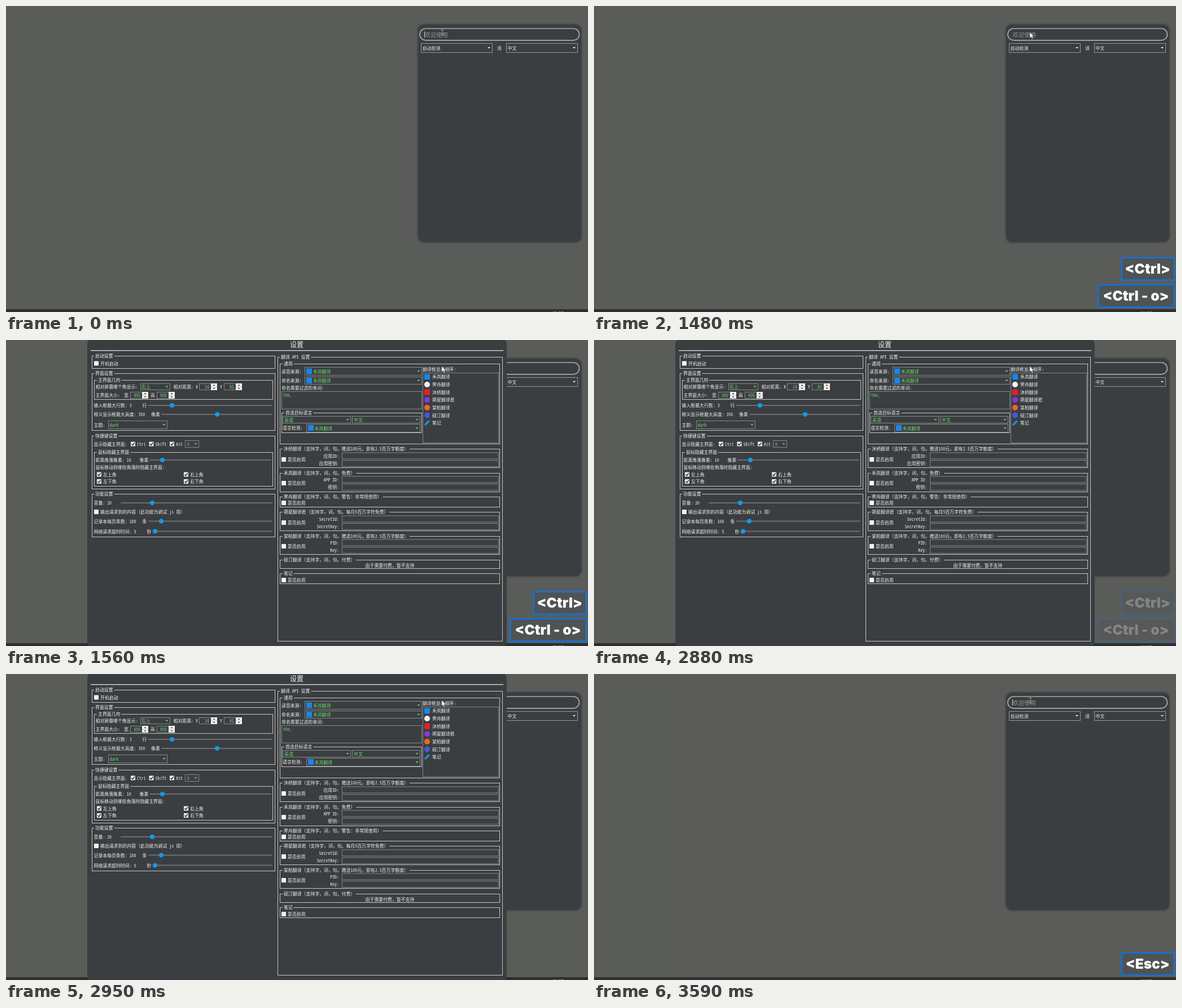
Recreate the animation shown at these times as an HTML page. Size 1031x543 px, loop 3970 ms.

```html
<!DOCTYPE html>
<html>
<head>
<meta charset="utf-8">
<style>
html, body { margin: 0; width: 100%; height: 100%; overflow: hidden; background: #5a5c5a; }
svg { display: block; width: 1031px; height: 543px; }
text { white-space: pre; }
.ui { font: 7.9px "Noto Sans Mono CJK SC", "Noto Sans CJK SC", "Noto Sans CJK", "Noto Sans Mono", monospace; }
.sans { font: 8px "Noto Sans CJK SC", "Noto Sans CJK", "Noto Sans", sans-serif; }
.keys { font: 900 24.5px Inter, "Open Sans", sans-serif; }
</style>
</head>
<body>
<svg id="stage" viewBox="0 0 1031 543"></svg>
<script>
const LOOP = 3970;
const PANEL = '#3b3e40', LINE = '#c4c6c6', FRAME = '#858788', GREEN = '#67df70', WHITE = '#f2f2f2';
const stage = document.getElementById('stage');
let layer = stage;

function add(tag, attrs, content) {
  const el = document.createElementNS('http://www.w3.org/2000/svg', tag);
  for (const key in attrs) el.setAttribute(key, attrs[key]);
  if (content !== undefined) el.textContent = content;
  return layer.appendChild(el);
}

function group(draw, cls = 'ui') {
  const parent = layer;
  const g = layer = add('g', { class: cls });
  draw();
  layer = parent;
  return g;
}

// Stepped opacity: [time, value] pairs, each held until the next.
function steps(el, list) {
  const frames = list.map(([t, opacity]) => ({ offset: t / LOOP, opacity, easing: 'steps(1, end)' }));
  frames.push({ offset: 1, opacity: list[list.length - 1][1] });
  el.animate(frames, { duration: LOOP, iterations: Infinity });
}

const fill = (x1, y1, x2, y2, color, rx = 0) =>
  add('rect', { x: x1, y: y1, width: x2 - x1, height: y2 - y1, fill: color, rx });

const frame = (x1, y1, x2, y2, color = FRAME, width = 1, rx = 0) =>
  add('rect', { x: x1 + .5, y: y1 + .5, width: x2 - x1 - 1, height: y2 - y1 - 1,
    fill: 'none', stroke: color, 'stroke-width': width, rx });

// y is the vertical middle of the characters.
const label = (x, y, str, color = WHITE, anchor = 'start') =>
  add('text', { x, y: y + 3, fill: color, 'text-anchor': anchor }, str);

const arrow = (x, y, color, r = 2.6) =>
  add('path', { d: `M${x - r} ${y - r / 2}h${2 * r}l${-r} ${r}z`, fill: color });

function box(title, x1, y1, x2, y2, tx = x1 + 6) {
  frame(x1, y1, x2, y2, LINE);
  const gap = fill(tx - 2, y1 - 1, tx, y1 + 2, PANEL);
  const text = label(tx, y1, title);
  gap.setAttribute('width', text.getComputedTextLength() + 4);
}

function check(x, y, str, ticked) {
  fill(x - 4, y - 4, x + 4, y + 4, WHITE, .8);
  if (ticked) add('path', { d: `M${x - 2.6} ${y}l2 2.2 3.4-4.4`, fill: 'none', stroke: '#222', 'stroke-width': 1.4 });
  label(x + 7, y, str);
}

function slider(x1, x2, y, knob) {
  fill(x1, y - 1, x2, y + 1, '#6c6f70', 1);
  add('circle', { cx: knob, cy: y, r: 4, fill: '#109ce8' });
}

function combo(x1, y1, x2, y2, str, tx = x1 + 2) {
  frame(x1, y1, x2, y2);
  label(tx, (y1 + y2) / 2, str, GREEN);
  arrow(x2 - 6, (y1 + y2) / 2, GREEN);
}

function spin(x1, x2, y, value) {
  frame(x1, y - 6, x2, y + 6);
  fill(x2 - 11, y - 6, x2, y + 6, WHITE);
  fill(x2 - 11, y - .3, x2, y + .3, '#aaa');
  arrow(x2 - 5.5, y + 3, '#222', 2);
  add('path', { d: `M${x2 - 7.5} ${y - 2}h4l-2-2z`, fill: '#222' });
  label(x2 - 14, y, value, GREEN, 'end');
}

function field(y, name) {
  label(590, y, name, WHITE, 'end');
  frame(595, y - 6, 873, y + 6);
}

const square = (x, y, color, r = 5) => fill(x - r, y - r, x + r, y + r, color);
const dot = (x, y, color) => add('circle', { cx: x, cy: y, r: 5, fill: color });

function mainWindow() {
  for (let i = 3; i > 0; i--)
    add('rect', { x: 730 - i, y: 33 - i, width: 289 + 2 * i, height: 386 + 2 * i, rx: 11 + i, fill: '#000', opacity: .06 });
  fill(730, 33, 1019, 419, PANEL, 11);
  add('rect', { x: 733, y: 40, width: 282.5, height: 20.8, rx: 10.4, fill: 'none', stroke: '#a9abab', 'stroke-width': 1.7 });
  add('text', { x: 741.6, y: 54.6, fill: '#929596', style: 'font-size:10.3px' }, '欢迎使用');
  for (const [x, str] of [[735, '自动检测'], [886, '中文']]) {
    frame(x, 66, x + 127, 83, '#969899');
    label(x + 2.5, 75, str);
    arrow(x + 120.5, 74.3, WHITE);
  }
  label(874, 75, '译', WHITE, 'middle');
}

function generalSettings() {
  box('启动设置', 152, 28, 477, 51);
  check(160, 41.5, '开机启动');

  box('界面设置', 152, 59, 477, 161);
  box('主界面几何', 156, 71, 473, 106, 163);
  label(158.5, 83, '相对屏幕哪个角显示:');
  combo(238, 77, 291, 89, '右上');
  label(296.5, 83, '相对距离: X');
  spin(342, 374, 83, '24');
  label(379, 83, 'Y');
  spin(386, 418, 83, '81');
  label(158.5, 98, '主界面大小:');
  label(209, 98, '宽');
  spin(220, 252, 98, '450');
  label(256, 98, '高');
  spin(267, 299, 98, '600');
  label(155.5, 116, '输入框最大行数: 3');
  label(241.5, 116, '行');
  slider(252, 472, 116, 294);
  label(155.5, 132, '释义显示框最大高度: 350');
  label(257, 132, '像素');
  slider(275, 472, 132, 374);
  label(155.5, 150.5, '主题:');
  combo(181, 143, 286, 158, 'dark', 183.5);

  box('快捷键设置', 152, 170, 477, 265);
  label(155.5, 185, '显示隐藏主界面:');
  check(225, 184.5, 'Ctrl', true);
  check(257.5, 184.5, 'Shift', true);
  check(294, 184.5, 'Alt', true);
  combo(317, 178, 342, 191, '0', 321);
  box('鼠标隐藏主界面', 156, 199, 473, 260, 163);
  label(158.5, 213, '距离角落像素: 10');
  label(236.5, 213, '像素');
  slider(254, 470, 213, 277);
  label(158.5, 226, '鼠标移动到哪些角落时隐藏主界面:');
  check(165, 238.5, '左上角', true);
  check(319, 238.5, '右上角', true);
  check(165, 251, '左下角', true);
  check(319, 251, '右下角', true);

  box('功能设置', 152, 273, 477, 350);
  label(155.5, 289, '音量: 20');
  slider(203, 472, 289, 259);
  check(160, 305, '输出请求到的内容（此功能为调试 js 用）');
  label(155.5, 321.5, '记录本每页条数: 100');
  label(241.5, 321.5, '条');
  slider(252, 472, 321.5, 275);
  label(155.5, 339.5, '网络请求超时时间: 5');
  label(249.5, 339.5, '秒');
  slider(260, 472, 339.5, 264);
}

function apiSettings() {
  const BLUE = '#1787ee';
  box('翻译 API 设置', 481, 30, 880, 535);
  box('通用', 485, 42, 875, 185, 492);
  label(488, 55.5, '读音来源:');
  combo(529, 48, 737, 63, '禾岚翻译', 544);
  square(537, 55.5, BLUE);
  label(488, 72, '命名来源:');
  combo(529, 65, 737, 79, '禾岚翻译', 544);
  square(537, 72, BLUE);
  label(488, 85, '命名需要过滤的单词:');
  frame(488, 91, 737, 123);
  label(491, 98, 'the,', GREEN);

  box('首选目标语言', 488, 129, 737, 165, 495);
  combo(490, 135, 611, 148, '英语', 493);
  combo(613, 135, 734, 148, '中文', 616);
  label(490, 156, '语言检测:');
  combo(532, 149, 734, 164, '禾岚翻译', 546.5);
  square(540, 156, BLUE);

  label(738, 52, '翻译框显示顺序:');
  frame(738, 58, 873, 183);
  const order = [
    ['禾岚翻译', square, BLUE], ['霁舟翻译', dot, '#f4f4f4'], ['沐桥翻译', square, '#e0232a'],
    ['朔星翻译君', dot, '#8a35e0'], ['棠柏翻译', dot, '#f26522'], ['砚汀翻译', dot, '#4a55d8']];
  order.forEach(([name, mark, color], i) => {
    const y = 65.3 + i * 13.65;
    mark(746, y, color);
    label(755, y, name);
  });
  add('path', { d: 'M741 152l1-3.6 6.2-6.2 2.6 2.6-6.2 6.2z', fill: '#1593e6' });
  label(755, 147, '笔记');

  const services = [
    [193, 227, '沐桥翻译（支持字，词，句。赠送100元，即有2.5百万字额度）', 212, '应用ID:', '应用密钥:'],
    [236, 270, '禾岚翻译（支持字，词，句。免费）', 254, 'APP ID:', '密钥:'],
    [278, 297, '霁舟翻译（支持字，词，句。警告：非常规使用）', 289],
    [305, 339, '朔星翻译君（支持字，词，句。每月5百万字符免费）', 324, 'SecretId:', 'SecretKey:'],
    [348, 381, '棠柏翻译（支持字，词，句。赠送100元，即有2.5百万字额度）', 366, 'PID:', 'Key:'],
    [390, 406, '砚汀翻译（支持字，词，句。付费）'],
    [414, 433, '笔记', 426]];
  for (const [top, bottom, title, y, ...fields] of services) {
    box(title, 485, top, 875, bottom, 492);
    if (y) check(492, y, '是否启用');
    fields.forEach((name, i) => field(y - 6.5 + i * 13.6, name));
  }
  label(680, 400, '由于需要付费，暂不支持', WHITE, 'middle');
}

function settings() {
  fill(144, -3, 887, 546, PANEL, 10);
  add('text', { x: 515, y: 12.6, fill: WHITE, 'text-anchor': 'middle', style: 'font-size:12px' }, '设置');
  fill(150, 18, 881, 19.4, '#d4d6d6');
  generalSettings();
  apiSettings();
}

function keyBadge(str, x, y) {
  add('rect', { x: x + 1.3, y: y + 1.3, width: 1029 - x - 2.6, height: 39.6, fill: '#505354', stroke: '#1372d6', 'stroke-width': 2.6 });
  add('text', { x: (x + 1028) / 2, y: y + 29, fill: '#fff', 'text-anchor': 'middle' }, str);
}

steps(group(() => fill(144, 0, 1031, 543, '#5b5b5a')), [[0, 0], [3500, 1]]);
fill(0, 538, 1031, 543, '#2c2e2f');
group(() => add('text', { x: 968, y: 547.5, fill: WHITE }, '11:36'), 'sans');

group(mainWindow, 'sans');
steps(group(() => fill(741, 45, 742, 56, '#c8caca')),
  [[0, 1], [470, 0], [940, 1], [1480, 0], [3590, 1]]);
steps(group(settings), [[0, 0], [1560, 1], [3500, 0]]);

const beam = group(() => add('path', {
  d: 'M770.5 42.5h2l.5.5.5-.5h2M773 43v8.5M770.5 52h2l.5-.5.5.5h2',
  fill: 'none', stroke: '#a5a7a7', 'stroke-width': 1 }));
steps(beam, [[0, 1], [1480, 0], [3500, 1]]);

const pointer = group(() => add('path', {
  d: 'M772 46.5v10.3l2.3-2.1 1.7 3.8 1.7-.8-1.7-3.6h3.2z',
  fill: '#fff', stroke: '#222', 'stroke-width': .5 }));
steps(pointer, [[0, 0], [1480, 1], [3500, 0]]);

steps(group(() => keyBadge('<Ctrl>', 933.5, 493.5), 'keys'), [[0, 0], [770, 1], [1480, 0]]);
steps(group(() => {
  keyBadge('<Ctrl>', 933.5, 445.5);
  keyBadge('<Ctrl - o>', 892, 493.5);
}, 'keys'), [[0, 0], [1480, 1], [2730, .8], [2810, .5], [2880, .25], [2950, 0]]);
steps(group(() => keyBadge('<Esc>', 933.5, 493.5), 'keys'), [[0, 0], [3500, 1]]);
</script>
</body>
</html>
```
